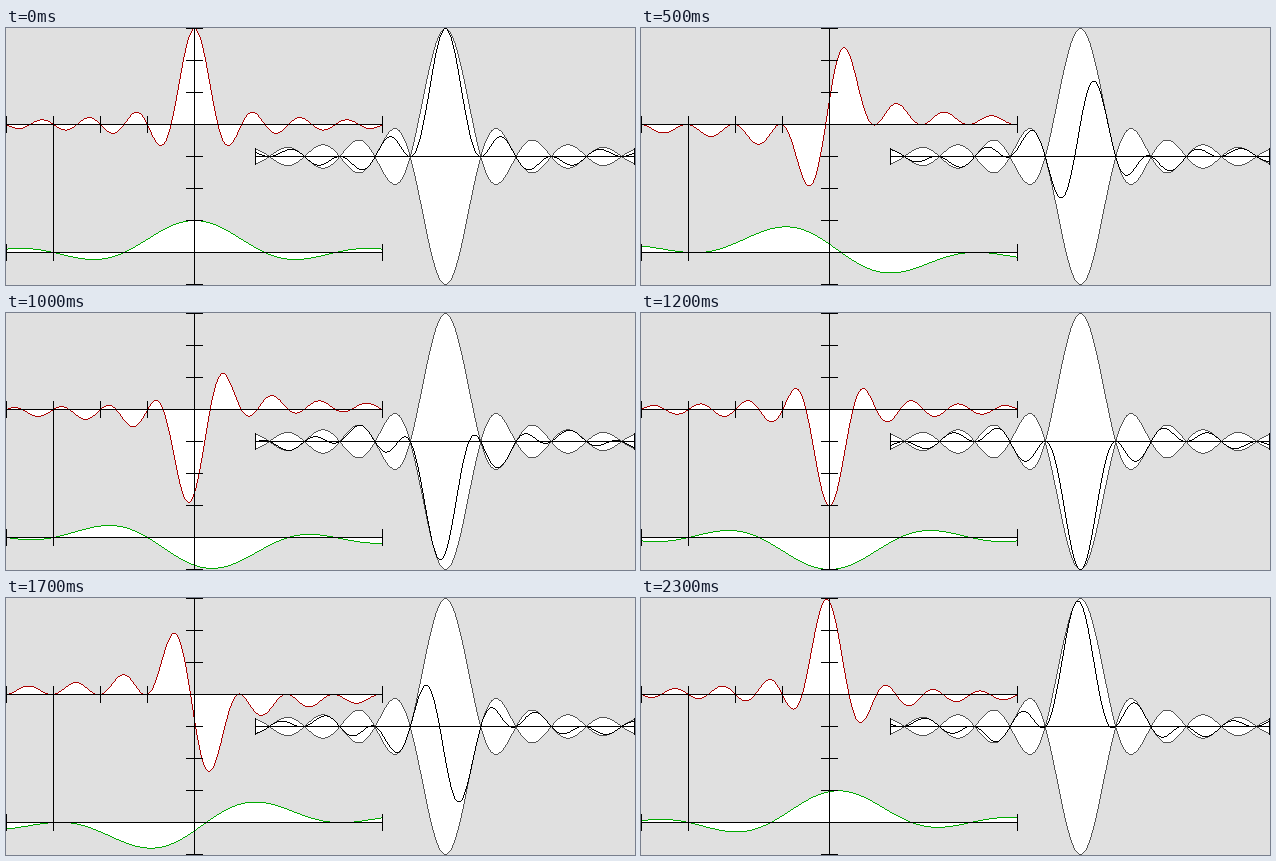
These frames come from a looping animation (629 px wide and 257 px high, 2.4 s). A matplotlib script:

```python
import numpy as np
import matplotlib.pyplot as plt
from matplotlib.animation import FuncAnimation

W, H, DPI = 629, 257, 100
FRAMES, INTERVAL = 24, 100

STEP = 47                      # spacing of the marks on the left axes
MID_L, MID_R = 4 * STEP, 439   # centres of the two plots
Y_RED, Y_SUM, Y_GREEN = 96, 128, 224
A_RED, A_GREEN = 96, 32

# Whole numbers in data space are pixel centres.
fig = plt.figure(figsize=(W / DPI, H / DPI), dpi=DPI, facecolor="#e0e0e0")
ax = fig.add_axes([0, 0, 1, 1])
ax.set_xlim(-0.5, W - 0.5)
ax.set_ylim(H - 0.5, -0.5)
ax.axis("off")


def packet(d, half, phase):
    """Equal mix of all waves from zero frequency up to pi / half."""
    return np.sinc(d / (2 * half)) * np.cos(np.pi * d / (2 * half) - phase)


def red(d, phase):
    return A_RED * packet(d, STEP / 2, phase)


def green(d, phase):
    return A_GREEN * packet(d, 3 * STEP / 2, -phase)


def both(d, phase):
    return red(d, phase) + green(d, phase)


def columns(x, top, bottom):
    """Outline of one-pixel-wide columns between two row edges."""
    edges = np.column_stack([x - 0.5, x + 0.5]).ravel()
    upper = np.column_stack([edges, np.repeat(top, 2)])
    lower = np.column_stack([edges, np.repeat(bottom, 2)])
    return np.vstack([upper, lower[::-1]])


def stroke(x, rows):
    """Outline of a connected one-pixel line through the given rows."""
    cut = np.floor((rows[1:] + rows[:-1]) / 2) + 0.5
    left = np.r_[rows[0] + 0.5, cut]
    right = np.r_[cut, rows[-1] + 0.5]
    top = np.minimum(rows - 0.5, np.minimum(left, right))
    bottom = np.maximum(rows + 0.5, np.maximum(left, right))
    return columns(x, top, bottom)


def shape(xy, color, z):
    return ax.fill(*xy.T, color=color, lw=0, snap=False, zorder=z)[0]


class Curve:
    def __init__(self, x, base, color, z=3, filled=True):
        self.x, self.base = x, base
        flat = np.full(len(x), float(base))
        self.line = shape(stroke(x, flat), color, z)
        self.area = shape(columns(x, flat, flat), "white", 1) if filled else None

    def set(self, height):
        rows = np.rint(self.base - height)
        self.line.set_xy(stroke(self.x, rows))
        if self.area:
            base = np.full(len(rows), float(self.base))
            self.area.set_xy(columns(self.x, base, rows))


def block(x0, x1, y0, y1):
    x, y = np.array([x0 - 0.5, x1 + 0.5]), np.array([y0 - 0.5, y1 + 0.5])
    shape(np.column_stack([x[[0, 1, 1, 0]], y[[0, 0, 1, 1]]]), "black", 4)


def hline(x0, x1, y):
    block(x0, x1, y, y)


def vline(x, y0, y1):
    block(x, x, y0, y1)


def axis(x0, x1, y, marks=()):
    hline(x0, x1, y)
    for x in (x0, *marks, x1):
        vline(x, y - 8, y + 8)


x_l = np.arange(0, 2 * MID_L + 1)
x_r = np.arange(249, W)
d_l, d_r = x_l - MID_L, x_r - MID_R

# Envelope of the sum
env = (A_RED + A_GREEN) * np.sinc(d_r / (0.75 * STEP))
for sign in (1, -1):
    Curve(x_r, Y_SUM, "#555555", z=2).set(sign * env)

# Axes
axis(0, 2 * MID_L, Y_RED, [STEP, 2 * STEP, 3 * STEP])
axis(0, 2 * MID_L, Y_GREEN)
axis(249, W - 1, Y_SUM)
vline(STEP, Y_RED - 8, Y_GREEN + 8)
vline(MID_L, 0, H - 1)
for y in range(0, H, 32):
    hline(MID_L - 8, MID_L + 8, y)

# Moving waves
waves = [
    (Curve(x_l, Y_RED, "#aa0000"), red, d_l),
    (Curve(x_l, Y_GREEN, "#00aa00"), green, d_l),
    (Curve(x_r, Y_SUM, "black", filled=False), both, d_r),
]


def update(i):
    phase = 2 * np.pi * i / FRAMES
    for curve, wave, d in waves:
        curve.set(wave(d, phase))


anim = FuncAnimation(fig, update, frames=FRAMES, interval=INTERVAL,
                     repeat=True, repeat_delay=0)
plt.show()
```
